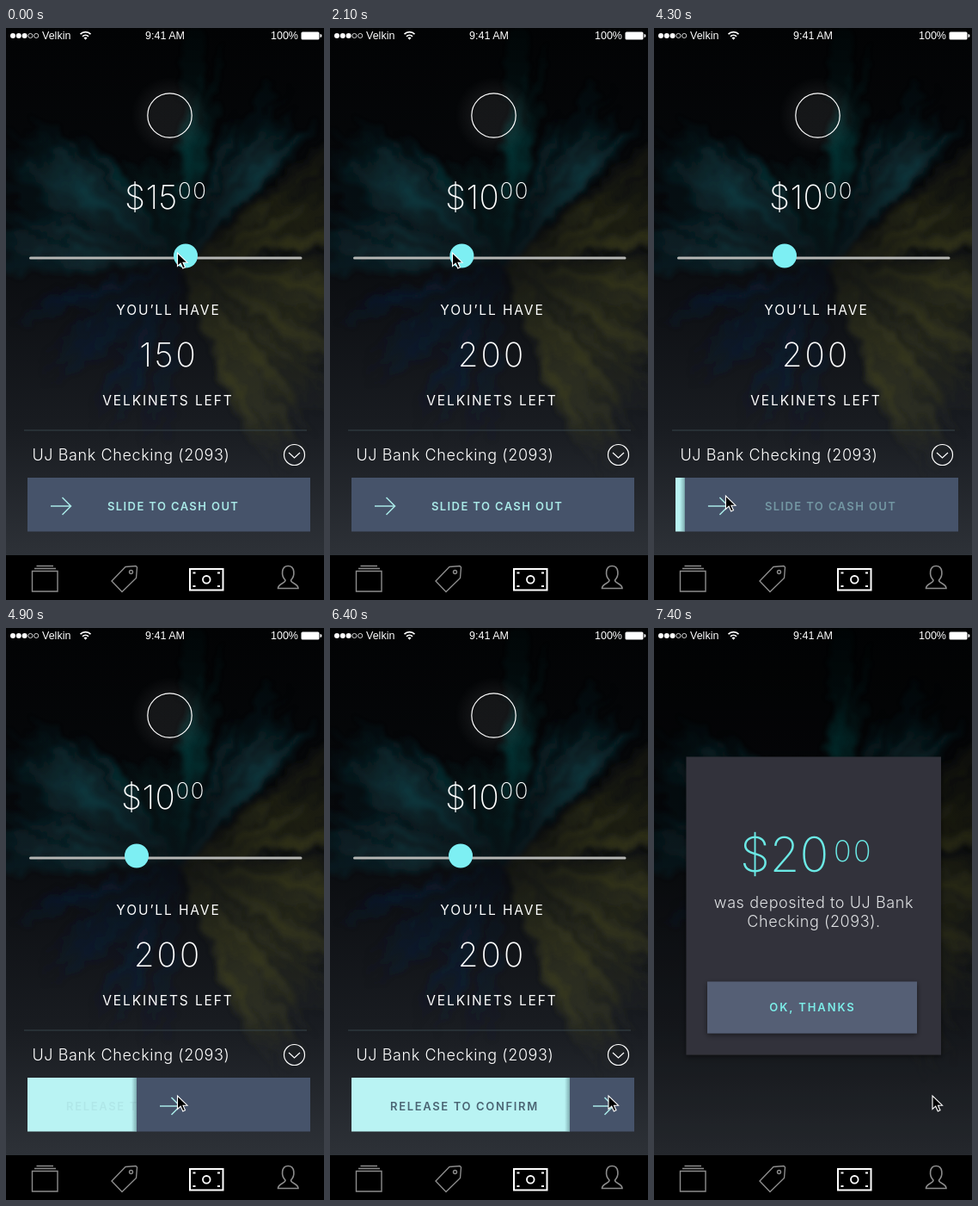
Animation of 370x664 px, one loop 7.5 s. Source, as an HTML page:

```html
<!DOCTYPE html>
<html lang="en">
<head>
<meta charset="utf-8">
<title>Cash out</title>
<style>
  html, body { margin: 0; width: 100%; height: 100%; overflow: hidden; background: #000; }
  svg { position: absolute; left: 0; top: 0; width: 370px; height: 664px; }
  #backdrop { will-change: transform; }
  text { font-family: Inter, Lato, sans-serif; fill: #fff; white-space: pre; }
  .status text { font: 12.5px "Liberation Sans", Arial, sans-serif; }
  .mid { text-anchor: middle; }
  .big { font-size: 38.5px; font-weight: 200; letter-spacing: .5px; }
  .count { letter-spacing: 3px; }
  .cents { font-size: 26px; font-weight: 200; letter-spacing: 1.5px; }
  .caps { font-size: 15.5px; letter-spacing: 1.9px; }
  .body { font-size: 18px; font-weight: 300; letter-spacing: .6px; }
  .action { font-size: 13px; font-weight: 600; letter-spacing: 1.4px; fill: #a9e9e7; }
  .line { fill: none; stroke: #fff; stroke-width: 1.2; }
  .tabs { fill: none; stroke: #8c8c8c; stroke-width: 1.4; }
</style>
</head>
<body>
<svg id="backdrop" viewBox="0 0 370 664">
  <defs>
    <linearGradient id="night" x2="0" y2="1">
      <stop stop-color="#020304"/><stop offset=".35" stop-color="#07090c"/>
      <stop offset=".7" stop-color="#191c21"/><stop offset=".92" stop-color="#2d3137"/>
    </linearGradient>
    <radialGradient id="reach" gradientUnits="userSpaceOnUse" cx="205" cy="275" r="285">
      <stop stop-color="#fff" stop-opacity=".3"/><stop offset=".2" stop-color="#fff" stop-opacity=".5"/>
      <stop offset=".5" stop-color="#fff"/><stop offset=".7" stop-color="#fff" stop-opacity=".9"/>
      <stop offset="1" stop-color="#fff" stop-opacity=".3"/>
    </radialGradient>
    <mask id="burst" maskUnits="userSpaceOnUse" x="0" y="0" width="370" height="664">
      <rect width="370" height="664" fill="url(#reach)"/>
    </mask>
    <filter id="powder" filterUnits="userSpaceOnUse" x="-40" y="-40" width="450" height="740">
      <feTurbulence type="fractalNoise" baseFrequency=".045" numOctaves="4" seed="4"/>
      <feDisplacementMap in="SourceGraphic" scale="28" xChannelSelector="R" yChannelSelector="G"/>
      <feGaussianBlur stdDeviation="2.5"/>
    </filter>
  </defs>
  <rect width="370" height="664" fill="url(#night)"/>
  <g mask="url(#burst)"><g id="plumes" filter="url(#powder)"></g></g>
</svg>

<svg viewBox="0 0 370 664">
  <defs>
    <radialGradient id="glow"><stop offset=".45" stop-color="#fff" stop-opacity=".07"/><stop offset="1" stop-color="#fff" stop-opacity="0"/></radialGradient>
    <linearGradient id="edge"><stop stop-color="#24404a" stop-opacity="0"/><stop offset="1" stop-color="#24404a" stop-opacity=".4"/></linearGradient>
    <filter id="shadow" x="-10%" y="-10%" width="120%" height="125%">
      <feDropShadow dx="0" dy="2" stdDeviation="3" flood-opacity=".5"/>
    </filter>
    <clipPath id="window"><rect x="109" y="165" width="154" height="60"/></clipPath>
    <clipPath id="bar"><rect x="25" y="522" width="329" height="62.500"/></clipPath>
  </defs>

  <g id="form">
    <circle cx="190.5" cy="101.5" r="46" fill="url(#glow)"/>
    <circle class="line" cx="190.5" cy="101.5" r="25.7"/>
    <g clip-path="url(#window)">
      <g id="ten"><text class="big" x="-1" y="210">$10</text><text class="cents" x="62.500" y="198">00</text></g>
      <g id="fifteen"><text class="big" x="-1" y="210">$15</text><text class="cents" x="61" y="198">00</text></g>
    </g>
    <path d="M28.5 267H343" stroke="#b5b6b4" stroke-width="3" stroke-linecap="round"/>
    <circle id="knob" cy="264.5" r="14" fill="#7deff3"/>
    <text class="caps mid" x="189" y="333">YOU’LL HAVE</text>
    <text class="big count mid" id="left150" y="393">150</text>
    <text class="big count mid" id="left200" y="393">200</text>
    <text class="caps mid" x="188.5" y="438">VELKINETS LEFT</text>
    <path d="M21 467H350" stroke="#36454a"/>
    <text class="body" x="30.500" y="502">UJ Bank Checking (2093)</text>
    <circle class="line" cx="335.5" cy="495.5" r="12"/>
    <path class="line" d="M329 493l6.5 6 6.5-6"/>
    <g clip-path="url(#bar)">
      <rect id="fill" x="25" y="522" height="63" fill="#b9f3f3"/>
      <text class="action" id="release" x="70" y="560" style="fill:#4a6473;letter-spacing:1.65px">RELEASE TO CONFIRM</text>
      <g id="slide">
        <rect x="19" y="522" width="6" height="63" fill="url(#edge)"/>
        <rect x="25" y="522" width="330" height="63" fill="#46536a"/>
        <path class="line" style="stroke:#a9e9e7;stroke-width:1.5" d="M52 555H75.500M65.500 545l10 10-10 10"/>
        <text class="action" id="hint" x="118" y="559.500">SLIDE TO CASH OUT</text>
      </g>
    </g>
  </g>

  <g id="popup">
    <rect width="370" height="612" opacity=".2"/>
    <rect x="37.500" y="149.500" width="296.500" height="346" fill="#30333b" filter="url(#shadow)"/>
    <g style="font-weight:200">
      <text x="100" y="283" style="font-size:56px;fill:#6be9e5">$20</text>
      <text x="209" y="271" style="font-size:34px;fill:#6be9e5;letter-spacing:2.5px">00</text>
    </g>
    <text class="body mid" x="186" y="325" style="fill:#dfe1e3">was deposited to UJ Bank</text>
    <text class="body mid" x="186" y="347" style="fill:#dfe1e3">Checking (2093).</text>
    <rect x="62" y="410.500" width="244" height="60" fill="#545f74" filter="url(#shadow)"/>
    <text class="action mid" x="184.500" y="445" style="fill:#7ceee9;letter-spacing:1.9px">OK, THANKS</text>
  </g>

  <g class="status">
    <g fill="#fff"><circle cx="8" cy="9" r="3"/><circle cx="14.800" cy="9" r="3"/><circle cx="21.600" cy="9" r="3"/></g>
    <g fill="none" stroke="#fff" stroke-width=".8"><circle cx="28.400" cy="9" r="2.600"/><circle cx="35.200" cy="9" r="2.600"/></g>
    <text x="42" y="13">Velkin</text>
    <path class="line" style="stroke-width:1.7" d="M86.500 7.200a8.500 8.500 0 0 1 12 0M89 9.800a5 5 0 0 1 7 0"/>
    <path fill="#fff" d="M90.500 11.500a3 3 0 0 1 4 0l-2 2.300z"/>
    <text class="mid" x="185" y="13">9:41 AM</text>
    <text x="308" y="13">100%</text>
    <rect x="343.500" y="4.500" width="21" height="9" rx="1.500" fill="#fff"/>
    <path fill="#fff" d="M365.500 7a2 2 0 0 1 0 4z"/>
  </g>

  <rect y="612" width="370" height="52"/>
  <g class="tabs">
    <path d="M30.500 630.500H60V654H30.500ZM33 627.500H58M35.500 624.500H55"/>
    <path d="M123 642l16-16.500 12-1 1.500 1.500-1 12.500L135 654.500Z"/>
    <circle cx="145.500" cy="631.500" r="2"/>
    <path stroke-width="1.600" d="M325 641c-5-5-5-16.500 3.200-16.500s8.300 11.500 3.300 16.500c0 4 8.500 3.500 8.500 9.500H316.500c0-6 8.500-5.500 8.500-9.500Z"/>
    <g stroke="#fff">
      <rect x="214" y="628" width="38.500" height="24.500" stroke-width="2"/>
      <circle cx="233.300" cy="640.300" r="4.300" stroke-width="1.800"/>
      <path stroke-width="1.800" d="M217.500 632.500h3M246 632.500h3M217.500 648h3M246 648h3"/>
    </g>
  </g>
  <path id="cursor" d="M0 0V15.500L3.700 12.200 6.300 18 9 16.800 6.500 11.200H11.500Z" stroke="#fff" stroke-width="1.100"/>
</svg>

<script>
  const LOOP = 7500, STEP = 100;
  const el = id => document.getElementById(id);
  const clamp = v => Math.min(1, Math.max(0, v));
  const move = (id, x, y = 0) => el(id).setAttribute('transform', `translate(${x} ${y})`);
  const fade = (id, v) => el(id).setAttribute('opacity', clamp(v));

  let seed = 7;
  const random = () => (seed = seed * 16807 % 2147483647) / 2147483647;
  const between = (a, b) => a + (b - a) * random();

  // A fan of thin powder streaks thrown out from the burst; angles in degrees
  function plume(color, from, to, near, far, count, opacity) {
    let shapes = '';
    for (let i = 0; i < count; i++) {
      const angle = between(from, to), length = between(near, far), spread = between(1.5, 4);
      const point = (turn, r) => {
        const a = (angle + turn) * Math.PI / 180;
        return `${(205 + r * Math.cos(a)).toFixed(1)} ${(275 + r * Math.sin(a)).toFixed(1)}`;
      };
      shapes += `<path fill="${color}" opacity="${opacity}" d="M205 275L${point(-spread, length * .8)} ${point(0, length)} ${point(spread, length * .8)}Z"/>`;
    }
    el('plumes').innerHTML += shapes;
  }
  plume('#142f4c', 95, 170, 110, 220, 60, .08);
  plume('#555029', -38, 72, 110, 285, 110, .11);
  plume('#12575a', 178, 234, 120, 265, 60, .11);
  plume('#12575a', 234, 268, 70, 150, 25, .09);
  plume('#12575a', 271, 283, 150, 290, 14, .1);
  plume('#12575a', 287, 314, 130, 245, 28, .11);

  // Smooth progress from 0 to 1 between two times
  const ease = (t, from, to) => {
    const u = clamp((t - from) / (to - from));
    return u * u * (3 - 2 * u);
  };

  function draw(t) {
    // Amount slider; knob and numbers trail the pointer
    const drag = ease(t, 600, 2100);
    const amount = ease(t, 535, 2035);
    el('knob').setAttribute('cx', 209 - 57 * ease(t, 740, 2240));
    move('ten', 9 + 126 * amount);
    move('fifteen', 139 + 126 * amount);
    el('left150').setAttribute('x', 189.5 - 33 * amount);
    el('left200').setAttribute('x', 188.5 + 33 * (1 - amount));
    fade('left150', 1 - 3 * amount);
    fade('left200', 3 * amount - 1);

    // Slide to confirm
    const slide = 254 * ease(t, 4100, 5700);
    move('slide', slide);
    el('fill').setAttribute('width', slide);
    fade('hint', 1 - slide / 20);
    fade('release', (slide - 120) / 90);

    // Confirmation
    const done = ease(t, 6400, 7100);
    fade('form', 1 - done);
    fade('popup', done);

    const down = ease(t, 2300, 3000), reach = ease(t, 3200, 3800);
    move('cursor',
      199.5 - 57 * drag - 2.5 * down - 67.5 * reach + slide - 2.5 * ease(t, 5800, 6200),
      261 + 231 * down + 51 * reach);
  }

  const start = performance.now();
  function tick() {
    const t = (performance.now() - start) % LOOP;
    draw(Math.floor(t / STEP) * STEP);
    requestAnimationFrame(tick);
  }
  tick();
</script>
</body>
</html>
```
